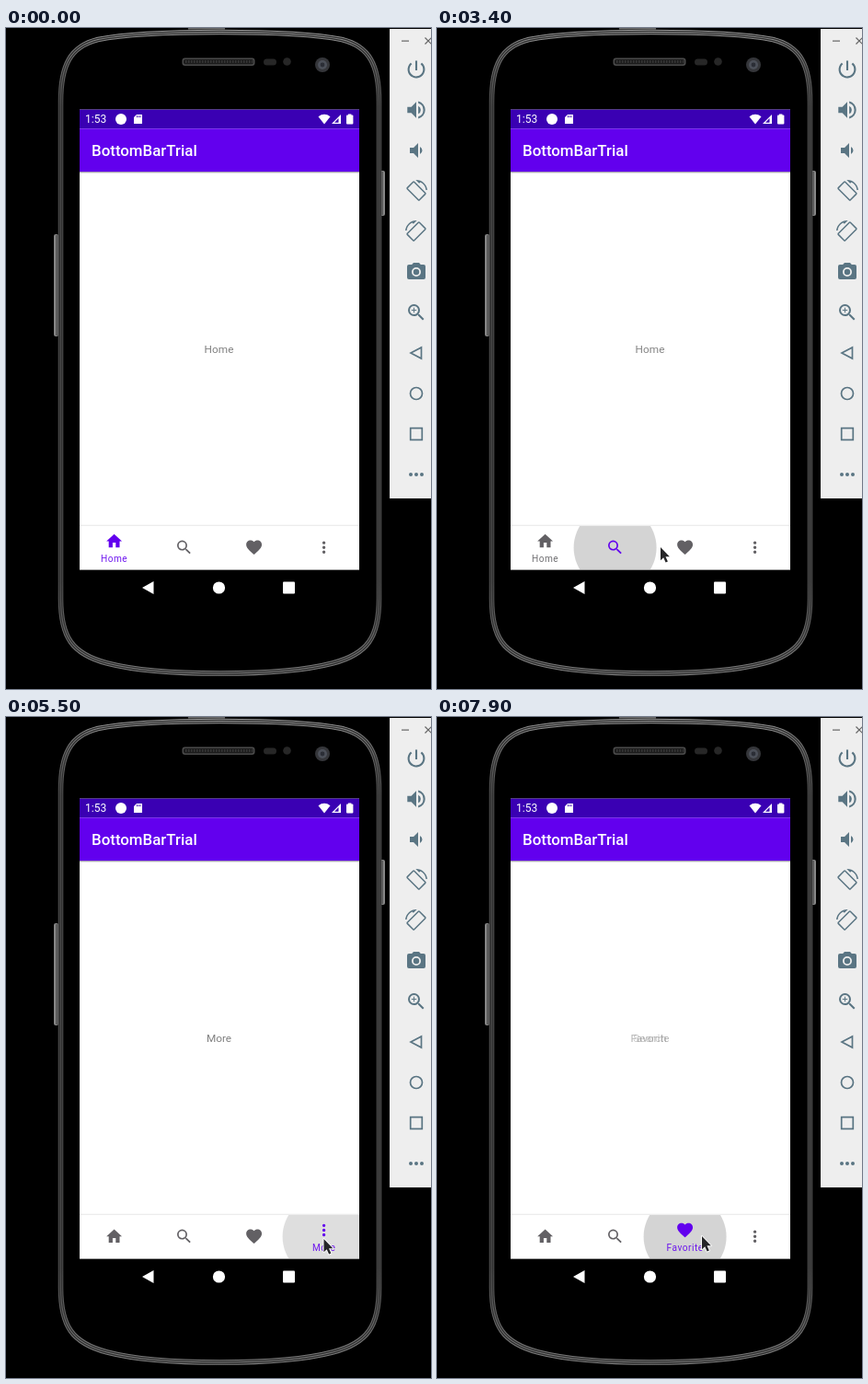
An HTML page with a canvas for the animation above (8000 ms loop, 462 px wide and 718 px high).

```html
<!DOCTYPE html>
<html lang="en">
<head>
<meta charset="utf-8">
<title>Bottom navigation</title>
<style>
html, body { margin: 0; width: 100%; height: 100%; overflow: hidden; background: #000; }
canvas { display: block; width: 462px; height: 718px; }
</style>
</head>
<body>
<canvas id="stage" width="462" height="718"></canvas>
<script>
const ctx = document.getElementById('stage').getContext('2d');
const LOOP = 8000, STEP = 100, DP = 304 / 360;
const PURPLE = '#6200ee', GREY = '#626064', SLATE = '#5a7583';
const NAMES = ['Home', 'Search', 'Favorite', 'More'];

const dot = (x, y, r) => `M${x - r} ${y}a${r} ${r} 0 1 0 ${2 * r} 0a${r} ${r} 0 1 0 ${-2 * r} 0z`;
const ICONS = [
  'M10 20v-6h4v6h5v-8h3L12 3 2 12h3v8z',
  'M15.5 14h-.79l-.28-.27A6.47 6.47 0 0 0 16 9.5 6.5 6.5 0 1 0 9.5 16c1.61 0 3.09-.59 4.23-1.57l.27.28v.79l5 4.99L20.49 19zm-6 0a4.5 4.5 0 1 1 0-9 4.5 4.5 0 0 1 0 9z',
  'M12 21.35l-1.45-1.32C5.4 15.36 2 12.28 2 8.5 2 5.42 4.42 3 7.5 3c1.74 0 3.41.81 4.5 2.09C13.09 3.81 14.76 3 16.5 3 19.58 3 22 5.42 22 8.5c0 3.78-3.4 6.86-8.55 11.54z',
  dot(12, 6, 2) + dot(12, 12, 2) + dot(12, 18, 2)
].map(d => new Path2D(d));
const ZOOM = new Path2D('M9 6.8h1v2.2h2.2v1H10v2.2H9V10H6.8V9H9z');
const POWER = new Path2D('M13 3h-2v10h2zm4.83 2.17l-1.42 1.42A6.92 6.92 0 0 1 19 12 7 7 0 1 1 7.59 6.59L6.17 5.17A9 9 0 1 0 21 12a8.93 8.93 0 0 0-3.17-6.83z');
const LOUD = new Path2D('M3 9v6h4l5 5V4L7 9zm13.5 3A4.5 4.5 0 0 0 14 7.97v8.05A4.5 4.5 0 0 0 16.5 12zM14 3.23v2.06a7 7 0 0 1 0 13.42v2.06a9 9 0 0 0 0-17.54z');
const QUIET = new Path2D('M18.5 12A4.5 4.5 0 0 0 16 7.97v8.05A4.5 4.5 0 0 0 18.5 12zM5 9v6h4l5 5V4L9 9z');
const ROTATE = new Path2D('M16.48 2.52A10.5 10.5 0 0 1 22.45 11h1.5A12 12 0 0 0 12 0l-.66.03 3.81 3.81zm-6.25-.77a1.5 1.5 0 0 0-2.12 0L1.75 8.11a1.5 1.5 0 0 0 0 2.12l12.02 12.02a1.5 1.5 0 0 0 2.12 0l6.36-6.36a1.5 1.5 0 0 0 0-2.12zm4.6 19.44L2.81 9.17l6.36-6.36 12.02 12.02z');
const CAMERA = new Path2D('M9 2L7.17 4H4a2 2 0 0 0-2 2v12a2 2 0 0 0 2 2h16a2 2 0 0 0 2-2V6a2 2 0 0 0-2-2h-3.17L15 2zm3 15a5 5 0 1 1 0-10 5 5 0 0 1 0 10z' + dot(12, 12, 3.2));
const ARROW = new Path2D('M0 0V14.2L3.2 11.2 5.6 16.6 7.9 15.6 5.5 10.3H9.9Z');

// left half of the frame from top to bottom, mirrored around the middle
const HALF = new Path2D('M232.5 4.5Q140 4.5 100 12.5C70 20 59.5 40 59.5 80V620C59.5 662 72 680 110 690Q152 701 232.5 701');
const RING = new Path2D(HALF);
RING.addPath(HALF, new DOMMatrix([-1, 0, 0, 1, 465, 0]));
const METAL = ctx.createLinearGradient(0, 0, 0, 706);
[[0, '#a2a2a2'], [0.03, '#787878'], [0.12, '#4c4c4c'], [0.85, '#4c4c4c'], [1, '#808080']]
  .forEach(s => METAL.addColorStop(...s));

// item, touch time, selection time
const TAPS = [[1, 3180, 3370], [2, 4230, 4270], [3, 5130, 5170], [0, 6500, 6540], [1, 7090, 7130], [2, 7725, 7765]];
// time, x, y of the pointer tip
const TRAIL = [
  [200, 475, 330], [900, 330, 505], [1500, 250, 561], [2400, 197, 563], [3000, 197, 563],
  [3400, 243, 564], [3900, 279, 563], [4200, 279, 563], [4900, 345.5, 567], [5600, 345.5, 567],
  [6300, 118, 563], [6700, 118, 563], [7050, 200, 564], [7250, 202, 565], [7600, 288, 564]
];

const ramp = (t, a, b) => Math.min(1, Math.max(0, (t - a) / (b - a)));
const smooth = k => k * k * (3 - 2 * k);
const centre = i => 117.6 + 76 * i;

function rect(x, y, w, h, color) {
  ctx.fillStyle = color;
  ctx.fillRect(x, y, w, h);
}

function circle(x, y, r, color) {
  ctx.fillStyle = color;
  ctx.beginPath();
  ctx.arc(x, y, r, 0, 7);
  ctx.fill();
}

function pill(x, y, w, h, r, color) {
  ctx.fillStyle = color;
  ctx.beginPath();
  ctx.roundRect(x, y, w, h, r);
  ctx.fill();
}

function poly(color, ...pts) {
  ctx.fillStyle = color;
  ctx.beginPath();
  pts.forEach(p => ctx.lineTo(...p));
  ctx.fill();
}

function icon(path, x, y, scale, color, flip = 1) {
  ctx.save();
  ctx.translate(x, y);
  ctx.scale(scale * flip, scale);
  ctx.translate(-12, -12);
  ctx.fillStyle = color;
  ctx.fill(path, 'evenodd');
  ctx.restore();
}

function text(str, x, y, size, color, { weight = 400, align = 'center', alpha = 1, space = 0 } = {}) {
  ctx.globalAlpha = alpha;
  ctx.font = `${weight} ${size}px Roboto, sans-serif`;
  ctx.letterSpacing = space + 'px';
  ctx.textAlign = align;
  ctx.fillStyle = color;
  ctx.fillText(str, x, y);
  ctx.globalAlpha = 1;
}

function drawBody() {
  rect(0, 0, 462, 718, '#000');
  rect(198, 0, 40, 1.5, '#6c6c6c');
  pill(52, 224, 5, 111, 2, '#868686');
  rect(54, 225, 3, 109, '#5c5c5c');
  pill(407, 155, 5, 49, 2, '#868686');
  rect(407, 156, 3, 47, '#5c5c5c');
  for (const [w, c] of [[5.6, METAL], [3.4, '#2a2a2a'], [1.2, METAL]]) {
    ctx.lineWidth = w;
    ctx.strokeStyle = c;
    ctx.stroke(RING);
  }
  pill(191.5, 32.5, 79, 8.5, 3, '#4a4a4a');
  pill(193, 34, 76, 5.5, 2, '#1c1c1c');
  for (let x = 195; x < 268; x += 3) rect(x, 35, 1.5, 3, '#363636');
  pill(280, 33.5, 14, 7, 3.5, '#272727');
  circle(305.5, 36.5, 4.3, '#272727');
  circle(344, 40, 8, '#35363a');
  circle(344, 40, 5, '#4c5059');
  circle(344, 40, 2.4, '#2b2e36');
}

function drawBars() {
  rect(80, 88.6, 304, 500, '#fff');
  rect(80, 88.6, 304, 20.7, '#3a00b3');
  rect(80, 109.3, 304, 46.7, PURPLE);
  rect(80, 156, 304, 1, '#a7a0b4');
  rect(80, 157, 304, 1, '#e4e4e6');
  text('1:53', 86, 103, 12, '#fff', { align: 'left' });
  circle(125, 99, 6, '#fff');
  poly('#fff', [142, 94], [148, 94], [148, 104], [139, 104], [139, 97]);
  for (let i = 0; i < 3; i++) rect(142 + i * 1.8, 95.2, 0.9, 2, '#3a00b3');
  ctx.fillStyle = '#fff';
  ctx.beginPath();
  ctx.moveTo(346, 104.5);
  ctx.lineTo(339.5, 96.2);
  ctx.quadraticCurveTo(346, 91.5, 352.5, 96.2);
  ctx.fill();
  poly('#fff', [364, 94], [364, 104], [354, 104]);
  poly('#3a00b3', [361.5, 98], [361.5, 102.7], [357, 102.7]);
  rect(372, 93.5, 3.4, 2, '#fff');
  pill(370, 94.5, 7.4, 10, 1, '#fff');
  text('BottomBarTrial', 93, 139.3, 20 * DP, '#fff', { weight: 500, align: 'left' });

  poly('#fff', [148, 608], [160.5, 601], [160.5, 615]);
  circle(231.5, 608, 6.6, '#fff');
  pill(301, 601.5, 13, 13, 1, '#fff');
}

function drawPanel() {
  rect(417, 1, 45, 510, '#eee');
  rect(430, 13.5, 8, 1.2, '#666');
  ctx.strokeStyle = '#666';
  ctx.lineWidth = 1.2;
  ctx.beginPath();
  ctx.moveTo(455.5, 10.5); ctx.lineTo(462.5, 17.5);
  ctx.moveTo(462.5, 10.5); ctx.lineTo(455.5, 17.5);
  ctx.stroke();
  icon(POWER, 446, 45, 1.05, SLATE);
  icon(LOUD, 446, 89, 1.08, SLATE);
  icon(QUIET, 446, 133, 1, SLATE);
  icon(ROTATE, 446, 177, 1, SLATE);
  icon(ROTATE, 446, 221, 1, SLATE, -1);
  icon(CAMERA, 446, 265, 1, SLATE);
  icon(ICONS[1], 446, 309, 1, SLATE);
  icon(ZOOM, 446, 309, 1, SLATE);
  ctx.strokeStyle = SLATE;
  ctx.lineWidth = 1.7;
  ctx.beginPath();
  ctx.moveTo(440, 353); ctx.lineTo(451.5, 347); ctx.lineTo(451.5, 359);
  ctx.closePath();
  ctx.moveTo(452.5, 397);
  ctx.arc(446, 397, 6.5, 0, 2 * Math.PI);
  ctx.rect(439.7, 434.7, 12.6, 12.6);
  ctx.stroke();
  for (const x of [440, 446, 452]) circle(x, 485, 2, SLATE);
}

function drawRipples(t) {
  ctx.save();
  ctx.beginPath();
  ctx.rect(80, 541, 304, 47);
  ctx.clip();
  for (const [item, press] of TAPS) {
    const age = t - press;
    if (age <= 0 || age >= 600) continue;
    const grow = 1 - (1 - ramp(age, 0, 150)) ** 2;
    const alpha = 0.17 * (1 - ramp(age, 300, 600));
    circle(centre(item), 564.5, 45 * grow, `rgba(0,0,0,${alpha})`);
  }
  ctx.restore();
}

function drawScreen(t) {
  let now = 0, old = 0, since = -1e4;
  for (const [item, , at] of TAPS) {
    if (t >= at) { old = now; now = item; since = at; }
  }
  const fade = ramp(t - since, 20, 220);
  const shift = smooth(ramp(t - since, 60, 130));
  const page = (i, alpha) => alpha > 0 && text(NAMES[i], 231.5, 353, 14 * DP, '#808080', { alpha });
  page(old, 1 - fade);
  page(now, fade);

  rect(80, 539, 304, 1, '#f9f9f9');
  rect(80, 540, 304, 1, '#ececec');
  drawRipples(t);
  NAMES.forEach((name, i) => {
    const up = i === now ? shift : i === old ? 1 - shift : 0;
    const color = i === now ? PURPLE : GREY;
    icon(ICONS[i], centre(i), 564.2 - 6.8 * up, DP, color);
    if (up > 0) text(name, centre(i), 579.6, 12 * DP, color, { alpha: up * 0.9, space: 0.5 });
  });
}

function drawPointer(t) {
  if (t < TRAIL[0][0]) return;
  let i = 0;
  while (i < TRAIL.length - 1 && TRAIL[i + 1][0] <= t) i++;
  const a = TRAIL[i], b = TRAIL[i + 1] || a;
  const k = a === b ? 0 : smooth(ramp(t, a[0], b[0]));
  ctx.save();
  ctx.translate(a[1] + (b[1] - a[1]) * k, a[2] + (b[2] - a[2]) * k);
  ctx.lineWidth = 1.8;
  ctx.lineJoin = 'round';
  ctx.strokeStyle = '#fff';
  ctx.stroke(ARROW);
  ctx.fillStyle = '#262628';
  ctx.fill(ARROW);
  ctx.restore();
}

const start = performance.now();
function frame() {
  const ms = Math.max(0, performance.now() - start) % LOOP;
  const t = Math.floor(ms / STEP) * STEP;
  drawBody();
  drawBars();
  drawScreen(t);
  drawPanel();
  drawPointer(t);
  requestAnimationFrame(frame);
}
frame();
</script>
</body>
</html>
```
